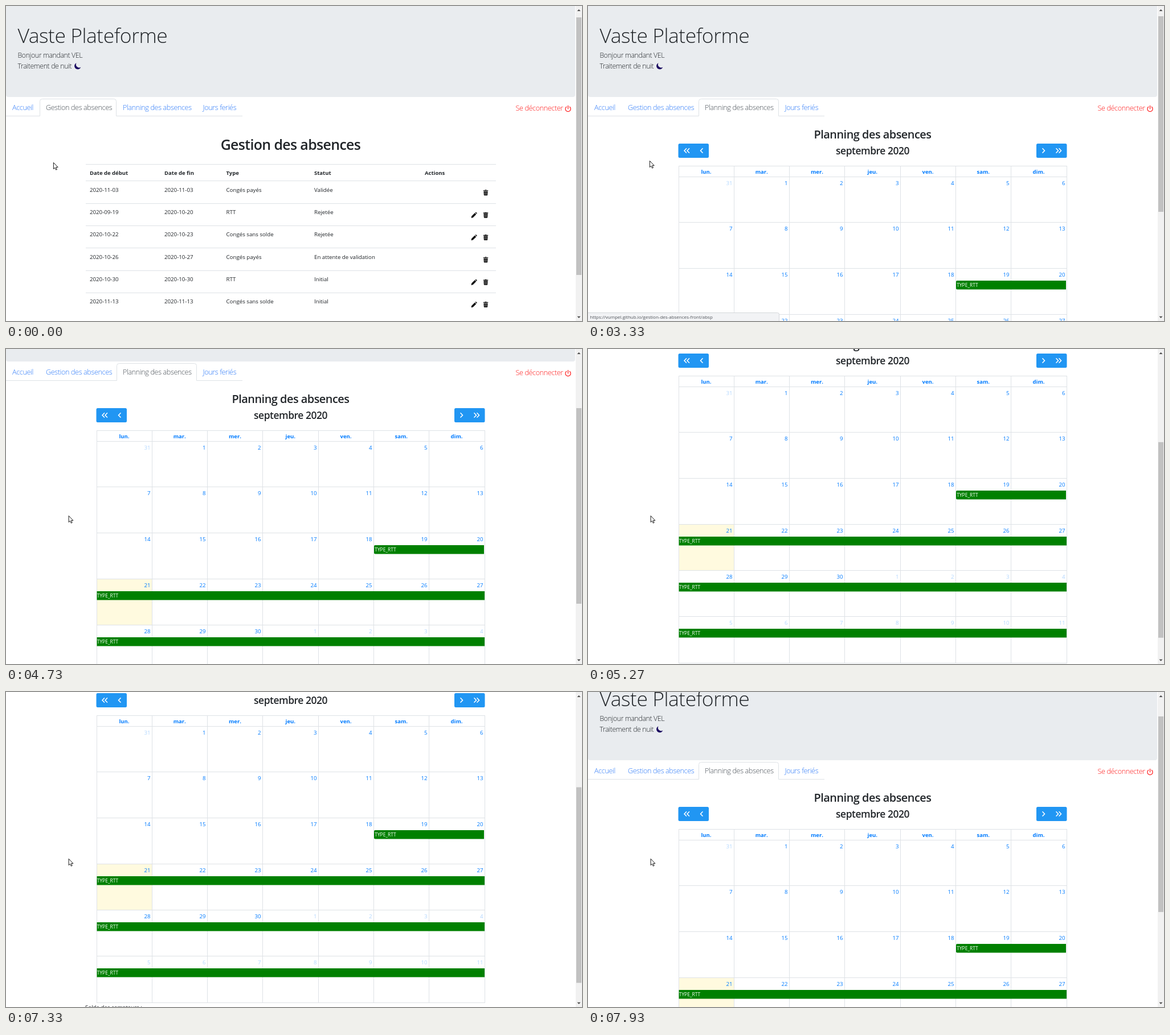
An HTML page that plays this animation: 1011 by 554 pixels, repeating every 8 s.

```html
<!DOCTYPE html>
<html lang="fr">
<head>
<meta charset="utf-8">
<title>Gestion des absences</title>
<style>
  html, body { margin: 0; width: 100%; height: 100%; overflow: hidden; background: #fff; }
  svg { display: block; width: 1011px; height: 554px; }
  text { font-family: "Open Sans", "Noto Sans", sans-serif; fill: #212529; white-space: pre; }
  .title { font-size: 35.5px; font-weight: 300; letter-spacing: -.5px; }
  .lead, .tab { font-size: 12.6px; font-weight: 300; letter-spacing: -.03em; }
  .lead { font-size: 12.3px; }
  .link { fill: #2e7af8; }
  .hover { fill: #0056b3; }
  .active { fill: #495057; }
  .exit { fill: #ff1a1a; }
  .h1, .h2, .h3 { font-weight: 600; letter-spacing: -.025em; text-anchor: middle; }
  .h1 { font-size: 24.9px; }
  .h2 { font-size: 19.9px; }
  .h3 { font-size: 17.4px; }
  .cell { font-size: 9.7px; }
  .head { font-size: 9.5px; font-weight: 700; }
  .name { font-size: 9.5px; font-weight: 700; fill: #007bff; text-anchor: middle; }
  .day { font-size: 9.7px; fill: #007bff; text-anchor: end; }
  .other { opacity: .3; }
  .tag { font-size: 8.4px; fill: #fff; }
  .url { font-size: 8px; fill: #50545a; }
  .line { fill: none; stroke: #dee2e6; }
</style>
</head>
<body>
<svg id="stage" viewBox="0 0 1011 554"></svg>
<script>
const NS = 'http://www.w3.org/2000/svg';
const LOOP = 8000, TICK = 1000 / 15;
const stage = document.getElementById('stage');

function add(parent, tag, attrs = {}, content) {
  const el = document.createElementNS(NS, tag);
  for (const key in attrs) el.setAttribute(key, attrs[key]);
  if (content !== undefined) el.textContent = content;
  return parent.appendChild(el);
}
const group = parent => add(parent, 'g');
const text = (p, x, y, cls, s) => add(p, 'text', { x, y, class: cls }, s);
const rect = (p, x, y, width, height, fill, rx = 0) => add(p, 'rect', { x, y, width, height, fill, rx });
const path = (p, d, attrs) => add(p, 'path', { d, ...attrs });
const line = (p, d) => path(p, d, { class: 'line' });
const show = (el, on) => el.setAttribute('display', on ? 'inline' : 'none');
const move = (el, x, y) => el.setAttribute('transform', `translate(${x} ${y})`);

const page = group(stage);

// Banner
path(page, 'M0 0H999V156a4 4 0 0 1-4 4H4a4 4 0 0 1-4-4Z', { fill: '#e9ecef' });
text(page, 20.5, 65, 'title', 'Vaste Plateforme');
text(page, 20.5, 91, 'lead', 'Bonjour mandant VEL');
text(page, 20.5, 110, 'lead', 'Traitement de nuit');
path(page, 'M123.5 100.2A5.8 5.8 0 1 0 131.3 107.6A5.6 5.6 0 0 1 123.5 100.2Z', { fill: '#1b0a60' });

// Tabs
const tabShape = (l, r) => `H${l}V167.5a4 4 0 0 1 4-4H${r - 4}a4 4 0 0 1 4 4V193.5`;
const labels = [[11, 'Accueil'], [70, 'Gestion des absences'], [205, 'Planning des absences'], [345.5, 'Jours feriés']];
const frameA = line(page, 'M0 193.5' + tabShape(59.5, 193.5) + 'H415');
const frameB = line(page, 'M0 193.5' + tabShape(194.5, 334.5) + 'H415');
const hoverFrame = line(page, 'M194.5 193.5' + tabShape(194.5, 334.5));
hoverFrame.style.stroke = '#e9ecef';
const tabs = labels.map(([x, s]) => text(page, x, 183, 'tab link', s));
text(page, 894.5, 184, 'tab exit', 'Se déconnecter');
path(page, 'M983.8 177.3A4.6 4.6 0 1 0 989.2 177.3M986.5 175.4V180.8',
  { fill: 'none', stroke: '#ff1a1a', 'stroke-width': 1.2, 'stroke-linecap': 'round' });

// Absence table
const listView = group(page);
text(listView, 499.5, 252.6, 'h1', 'Gestion des absences');
const columns = [147, 278, 386.5, 541, 735];
['Date de début', 'Date de fin', 'Type', 'Statut', 'Actions']
  .forEach((s, i) => text(listView, columns[i], 297, 'head', s));
line(listView, 'M140 278.5H860');

function trash(p, y) {
  const g = group(p);
  move(g, 842, y);
  path(g, 'M-4.2-4.3H-1.7L-1.2-5H1.2L1.7-4.3H4.2V-3H-4.2ZM-3.6-2.4H3.6L3.2 4.2Q3.1 5 2.3 5H-2.3Q-3.1 5-3.2 4.2Z', { fill: '#111' });
  path(g, 'M-1.7-1.2V3.7M0-1.2V3.7M1.7-1.2V3.7', { stroke: '#aaa', 'stroke-width': .6 });
}
function pencil(p, y) {
  const g = group(p);
  move(g, 821.5, y);
  path(g, 'M-5 5L-4.4 1.9L1.3-3.8L3.8-1.3L-1.9 4.4ZM2-4.4L2.7-5Q3.4-5.4 4-4.8L4.9-3.9Q5.4-3.3 5-2.7L4.4-2Z', { fill: '#111' });
}
const rows = [
  ['2020-11-03', '2020-11-03', 'Congés payés', 'Validée'],
  ['2020-09-19', '2020-10-20', 'RTT', 'Rejetée'],
  ['2020-10-22', '2020-10-23', 'Congés sans solde', 'Rejetée'],
  ['2020-10-26', '2020-10-27', 'Congés payés', 'En attente de validation'],
  ['2020-10-30', '2020-10-30', 'RTT', 'Initial'],
  ['2020-11-13', '2020-11-13', 'Congés sans solde', 'Initial']
];
rows.forEach((row, i) => {
  const dy = 39.35 * i;
  line(listView, `M140 ${Math.floor(307.9 + dy) + .5}H860`);
  row.forEach((s, j) => text(listView, columns[j], Math.round(326.5 + dy), 'cell', s));
  trash(listView, 328.3 + dy);
  if (i % 3) pencil(listView, 328.5 + dy);
});

// Calendar
const calView = group(page);
text(calView, 499.5, 233, 'h2', 'Planning des absences');
text(calView, 499.5, 261, 'h3', 'septembre 2020');
const chevron = (x, dir) => path(calView, `M${x - 2 * dir} 250.2L${x + 2 * dir} 254.4L${x - 2 * dir} 258.6`,
  { fill: 'none', stroke: '#fff', 'stroke-width': 1.5 });
rect(calView, 158.5, 242, 53.5, 25, '#2196f3', 2.5);
rect(calView, 787, 242, 53.5, 25, '#2196f3', 2.5);
[171, 176, 199.5].forEach(x => chevron(x, -1));
[799.5, 823.5, 828.5].forEach(x => chevron(x, 1));

const colX = i => Math.floor(159 + 97.33 * i) + .5;
const rowY = i => i > 5 ? 786.5 : Math.floor(300 + 80.8 * i) + .5;
rect(calView, 159, rowY(3), 97, 81, '#fffadf');
line(calView, 'M159 281.5H841');
for (let i = 0; i < 8; i++) line(calView, `M${colX(i)} 281V787`);
for (let i = 0; i < 7; i++) line(calView, `M159 ${rowY(i)}H841`);
['lun.', 'mar.', 'mer.', 'jeu.', 'ven.', 'sam.', 'dim.']
  .forEach((s, i) => text(calView, 207.5 + 97.25 * i, 295, 'name', s));
for (let i = 0; i < 42; i++) {
  const inMonth = i > 0 && i < 31;
  const n = i === 0 ? 31 : inMonth ? i : i - 30;
  text(calView, colX(i % 7 + 1) - 3, rowY(Math.floor(i / 7)) + 14.5, inMonth ? 'day' : 'day other', n);
}
const events = group(calView);
for (let i = 2; i < 6; i++) {
  const first = i === 2, x = first ? 646 : 159.5, y = rowY(i) + 21.5;
  path(events, first ? `M839 ${y}H648a2 2 0 0 0-2 2v11.5a2 2 0 0 0 2 2H839Z` : `M${x} ${y}H840v15.5H${x}Z`, { fill: 'green' });
  text(events, x + (first ? 1.3 : .3), y + 11, 'tag', 'TYPE_RTT');
}
text(calView, 139, 797.5, 'cell', 'Solde des compteurs :');

// Link preview
const bubble = group(stage);
path(bubble, 'M-1 555V539.5H332.5a3 3 0 0 1 3 3V555Z', { fill: '#f2f3f5', stroke: '#d5d7da' });
text(bubble, 3.5, 550, 'url', 'https://vumpel.github.io/gestion-des-absences-front/absp');

// Scrollbar
rect(stage, 1000, 0, 11, 554, '#f1f1f1');
const thumb = rect(stage, 1001, 20, 9, 453, '#c1c1c1');
path(stage, 'M1002.5 9L1005.5 5.8L1008.5 9ZM1002.5 545.8H1008.5L1005.5 549Z', { fill: '#505050' });

// Pointers, both with the hot spot at 0,0
const ink = { fill: '#fff', stroke: '#000', 'stroke-width': .9, 'stroke-linejoin': 'round' };
const arrow = path(stage, 'M.4.4V11.6L2.9 9.3L4.6 13.2L6.4 12.4L4.8 8.6H8.2Z', ink);
const hand = group(stage);
path(hand, 'M-1.3 9V1.3a1.3 1.3 0 0 1 2.6 0V6a1.2 1.2 0 0 1 2.3.4a1.2 1.2 0 0 1 2.2.5a1.1 1.1 0 0 1 1.5.8V11c0 2-1.2 3-1.2 5H-.8C-1 14-4 11-4.4 9.2C-4.5 7.6-2.6 7.6-1.3 9.8Z', ink);
path(hand, 'M1.3 6V8.5M3.6 6.6V8.8M5.8 7V9', { stroke: '#000', 'stroke-width': .8 });

// Time, value
const scrollSteps = [
  [0, 0], [4067, 16], [4133, 58], [4267, 73], [4333, 108], [4400, 120],
  [4733, 138], [4800, 170], [4867, 180],
  [5200, 200], [5267, 234], [5333, 252], [5400, 266], [5467, 274], [5533, 280], [5600, 282]
];
const bubbleSteps = [[0, 0], [1800, .5], [1867, 1], [3400, .5], [3467, 0]];
const pointerKeys = [
  [0, 83, 275], [600, 83, 275], [1467, 235, 189], [1600, 244.5, 180], [2867, 244.5, 180],
  [3333, 108, 272], [3600, 109.7, 293], [LOOP, 109.7, 293]
];

const stepAt = (steps, t) => steps.reduce((v, s) => s[0] <= t ? s[1] : v, 0);

function pointerAt(t) {
  const i = pointerKeys.findIndex(k => k[0] > t);
  const [t0, x0, y0] = pointerKeys[i - 1], [t1, x1, y1] = pointerKeys[i];
  const u = (t - t0) / (t1 - t0), e = u * u * (3 - 2 * u);
  return [x0 + (x1 - x0) * e, y0 + (y1 - y0) * e];
}

function scrollAt(t) {
  if (t < 7330) return stepAt(scrollSteps, t);
  return Math.round(240 - 200 * (t - 7333) / 600);
}

function render(now) {
  const t = Math.min(LOOP - 1, Math.floor((now + 4) / TICK) * TICK + 1);
  const [x, y] = pointerAt(t), scroll = scrollAt(t);
  const planning = t > 2460;
  const onTab = y < 193 && x < 415 && t < 3400;
  const hover = onTab && !planning && x > 194;

  move(page, 0, -scroll);
  show(listView, !planning);
  show(calView, planning);
  show(events, t > 2725);
  show(frameA, !planning);
  show(frameB, planning);
  show(hoverFrame, hover);
  tabs.forEach((tab, i) => {
    const state = i === (planning ? 2 : 1) ? 'active' : hover && i === 2 ? 'hover' : 'link';
    tab.setAttribute('class', 'tab ' + state);
  });

  bubble.setAttribute('opacity', stepAt(bubbleSteps, t));
  thumb.setAttribute('y', planning ? 18 + scroll * .623 : 20);
  thumb.setAttribute('height', planning ? 344 : 453);

  show(arrow, !onTab);
  show(hand, onTab);
  move(onTab ? hand : arrow, x, y);
}

const start = performance.now();
function tick() {
  render((performance.now() - start) % LOOP);
  requestAnimationFrame(tick);
}
tick();
</script>
</body>
</html>
```
